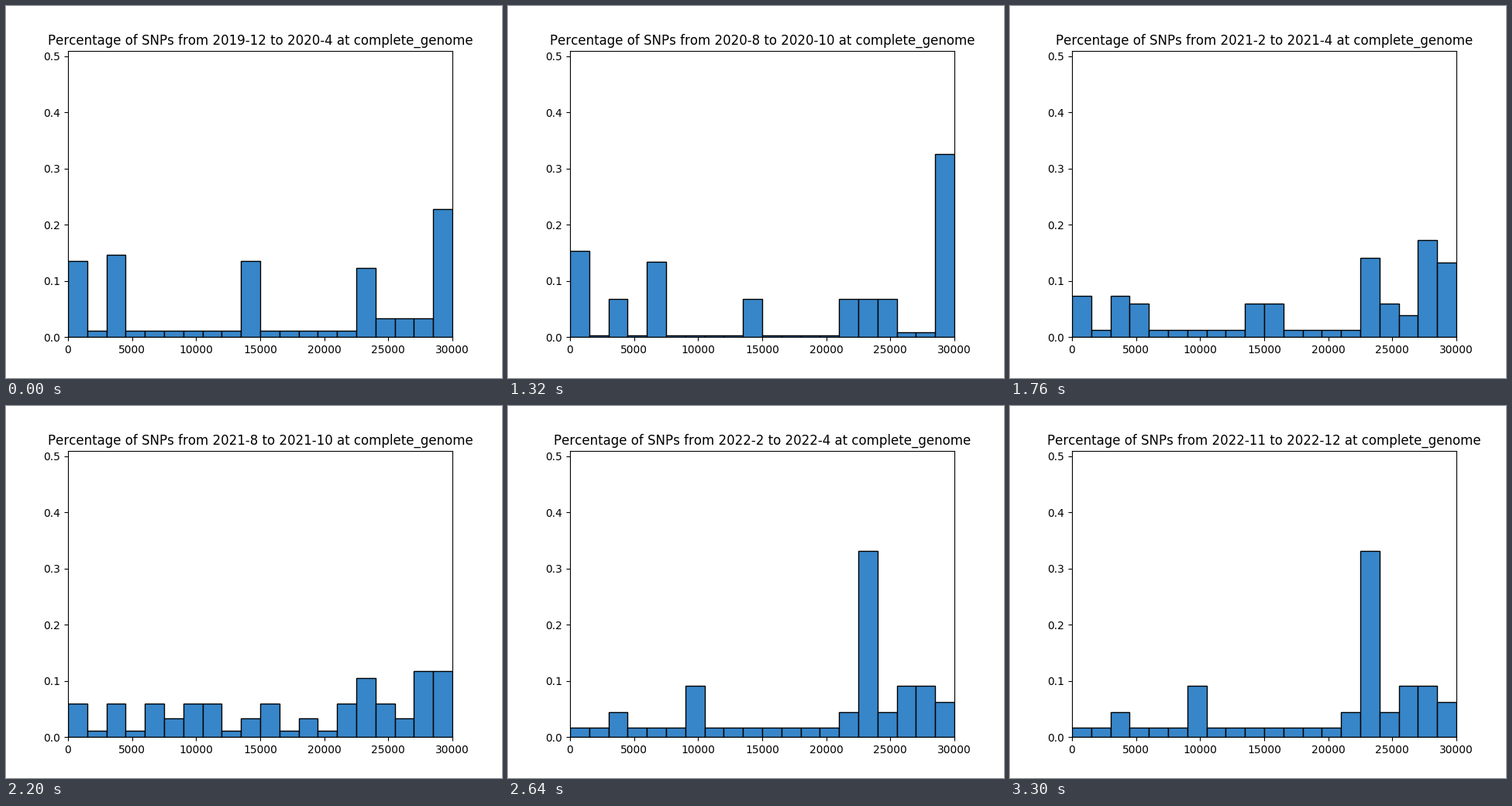
Recreate the animation shown at these times as a matplotlib script. Size 640x480 px, loop 3.52 s.

```python
import numpy as np
import matplotlib.pyplot as plt
from matplotlib.animation import FuncAnimation

STEP = 220           # ms per picture
HOLD = 5             # the first period stays for five steps
PERIODS = 12
BINS = 20
GENOME = 30000

# Mutation hot spots at a few key periods: share of SNPs -> bins
HOT = {
    0: {.228: [19], .147: [2], .135: [0, 9], .123: [15]},
    1: {.293: [19], .118: [0], .104: [2, 9, 15], .050: [12]},
    2: {.326: [19], .153: [0], .134: [4], .068: [2, 9, 14, 15, 16]},
    4: {.173: [18], .141: [15], .133: [19], .073: [0, 2],
        .060: [3, 9, 10, 16]},
    6: {.117: [18, 19], .105: [15], .059: [0, 2, 4, 6, 7, 10, 14, 16],
        .033: [5, 9, 12]},
    8: {.332: [15], .092: [6, 17, 18], .063: [19], .045: [2, 14, 16]},
}


def histogram(hot):
    """Place the hot spots and spread the remainder, denser near the end."""
    bars = np.zeros(BINS)
    for share, bins in hot.items():
        bars[bins] = share
    weight = np.where(np.arange(BINS) < 16, 1, 3) * (bars == 0)
    return bars + (1 - bars.sum()) * weight / weight.sum()


def month(n):
    """Name the month n months after January 2020."""
    return f"{2020 + n // 12}-{n % 12 + 1}"


def title(period):
    first = 1 + 3 * period if period else -1
    last = min(3 + 3 * period, 35)
    return (f"Percentage of SNPs from {month(first)} to {month(last)}"
            " at complete_genome")


keys = np.array([histogram(hot) for hot in HOT.values()])
shares = np.array([np.interp(range(PERIODS), list(HOT), col)
                   for col in keys.T]).T

plt.rcParams["text.kerning_factor"] = 6
fig, ax = plt.subplots(figsize=(6.4, 4.8), dpi=100)
width = GENOME / BINS
bars = ax.bar(np.arange(BINS) * width, shares[0], width=width, align="edge",
              color="#3786c9", edgecolor="black", linewidth=1)
ax.set_xlim(0, GENOME)
ax.set_ylim(0, 0.51)
heading = ax.set_title(title(0))


def draw(frame):
    period = max(0, frame - HOLD + 1)
    for bar, height in zip(bars, shares[period]):
        bar.set_height(height)
    heading.set_text(title(period))
    return [*bars, heading]


anim = FuncAnimation(fig, draw, frames=HOLD + PERIODS - 1, interval=STEP,
                     repeat=True, repeat_delay=0, blit=False)
plt.show()
```
